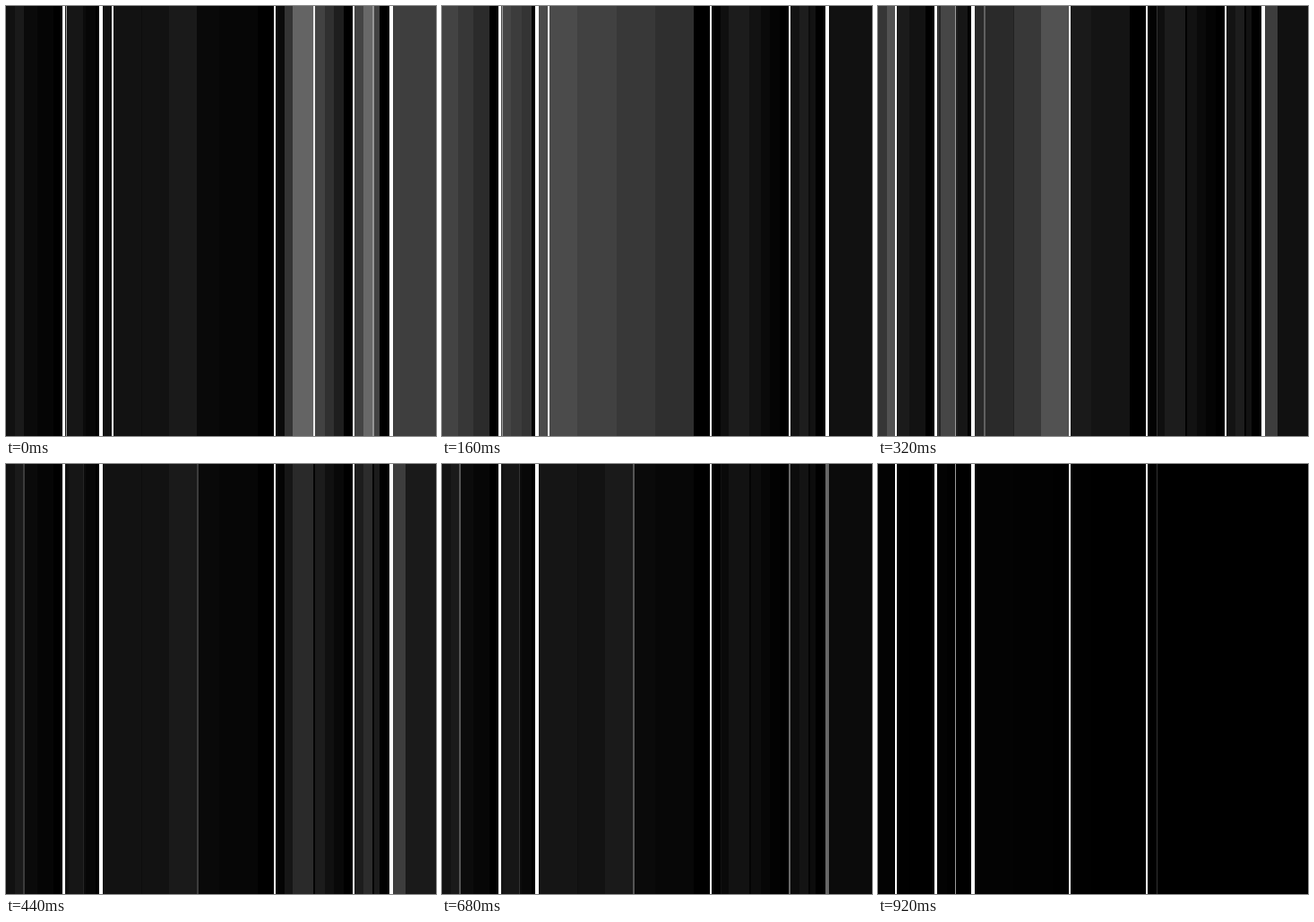
These frames come from a looping animation (480 px wide and 480 px high, 960 ms). An HTML page with a canvas:

```html
<!DOCTYPE html>
<html lang="en">
<head>
<meta charset="utf-8">
<title>Strobing bars</title>
<style>
  html, body { margin: 0; width: 100%; height: 100%; overflow: hidden; background: #000; }
  canvas { display: block; width: 480px; height: 480px; }
</style>
</head>
<body>
<canvas id="stage" width="480" height="480"></canvas>
<script>
const SIZE = 480, LOOP = 960, STEP = 40;
const ctx = document.getElementById('stage').getContext('2d');

const pulse = (t, peak, spread) => Math.exp(-(((t - peak) / spread) ** 2));
const ramp = (t, from, to) => Math.min(1, Math.max(0, (t - from) / (to - from)));

function bar(x, width, level) {
  const gray = Math.round(level);
  ctx.fillStyle = `rgb(${gray}, ${gray}, ${gray})`;
  ctx.fillRect(x, 0, width, SIZE);
}

// A stepped gradient; where it falls off, the far steps dim sooner.
function glow(light, from, to, first, last = first, steps = 1) {
  const width = (to - from) / steps;
  for (let n = 0; n < steps; n++) {
    const along = steps > 1 ? n / (steps - 1) : 0;
    const power = last < first ? 1 + along / 2 : 1;
    const left = Math.round(from + n * width);
    const right = Math.round(from + (n + 1) * width);
    bar(left, right - left, (first + (last - first) * along) * light ** power);
  }
}

function drawLeft(t) {
  const rest = 1 - ramp(t, 760, 920);
  const wash = Math.max(0.23 * rest, pulse(t, 200, 150), 0.5 * pulse(t, 760, 100));
  glow(wash, 0, 53, 72, 48, 3);
  glow(wash, 66, 100, 74, 58, 3);
  glow(wash, 108, 281, 80, 52, 4);

  const rise = Math.max(0.28 * rest, pulse(t, 270, 150));
  glow(rise, 0, 20, 60, 92, 2);
  glow(rise, 70, 86, 78);
  glow(rise, 121, 213, 34, 92, 3);
}

function drawRight(t) {
  const rest = 1 - ramp(t, 560, 900);
  const flash = Math.max(0.28 * rest, pulse(t, 0, 100), 0.42 * pulse(t, 440, 80));
  glow(flash, 301, 311, 10);
  glow(flash, 311, 320, 52);
  glow(flash, 320, 343, 100);
  glow(flash, 345, 377, 66, 30, 3);
  glow(flash, 389, 409, 68, 104, 2);
  glow(flash, 411, 417, 66);
  glow(flash, 432, 480, 62);
  glow(pulse(t, 380, 150), 432, 446, 72);
}

function drawLines(t) {
  bar(63, 3, 255);
  bar(104, 4, 255);
  bar(299, 2, 255);

  const swell = Math.max(pulse(t, 320, 100), ramp(t, 560, 920));
  bar(19, 2, 255 * swell);
  bar(86, 1, 155 * swell);
  bar(213, 2, 255 * swell);
  bar(311, 1, 50 * swell);

  const early = 1 - ramp(t, 160, 420);
  bar(67, 1, 160 * early);
  bar(118, 2, 250 * early);

  const spark = Math.max(pulse(t, 0, 100), pulse(t, 560, 60));
  bar(343, 2, 235 * spark);
  bar(409, 2, 150 * spark);

  const lit = 1 - ramp(t, 560, 760);
  bar(387, 2, 255 * lit);
  bar(428, 4, 255 * lit);
}

function draw(time) {
  const t = Math.floor((time % LOOP) / STEP) * STEP;
  ctx.globalCompositeOperation = 'source-over';
  bar(0, SIZE, 0);
  ctx.globalCompositeOperation = 'lighten';
  drawLeft(t);
  drawRight(t);
  drawLines(t);
}

const start = performance.now();
function tick() {
  draw(performance.now() - start);
  requestAnimationFrame(tick);
}
tick();
</script>
</body>
</html>
```
